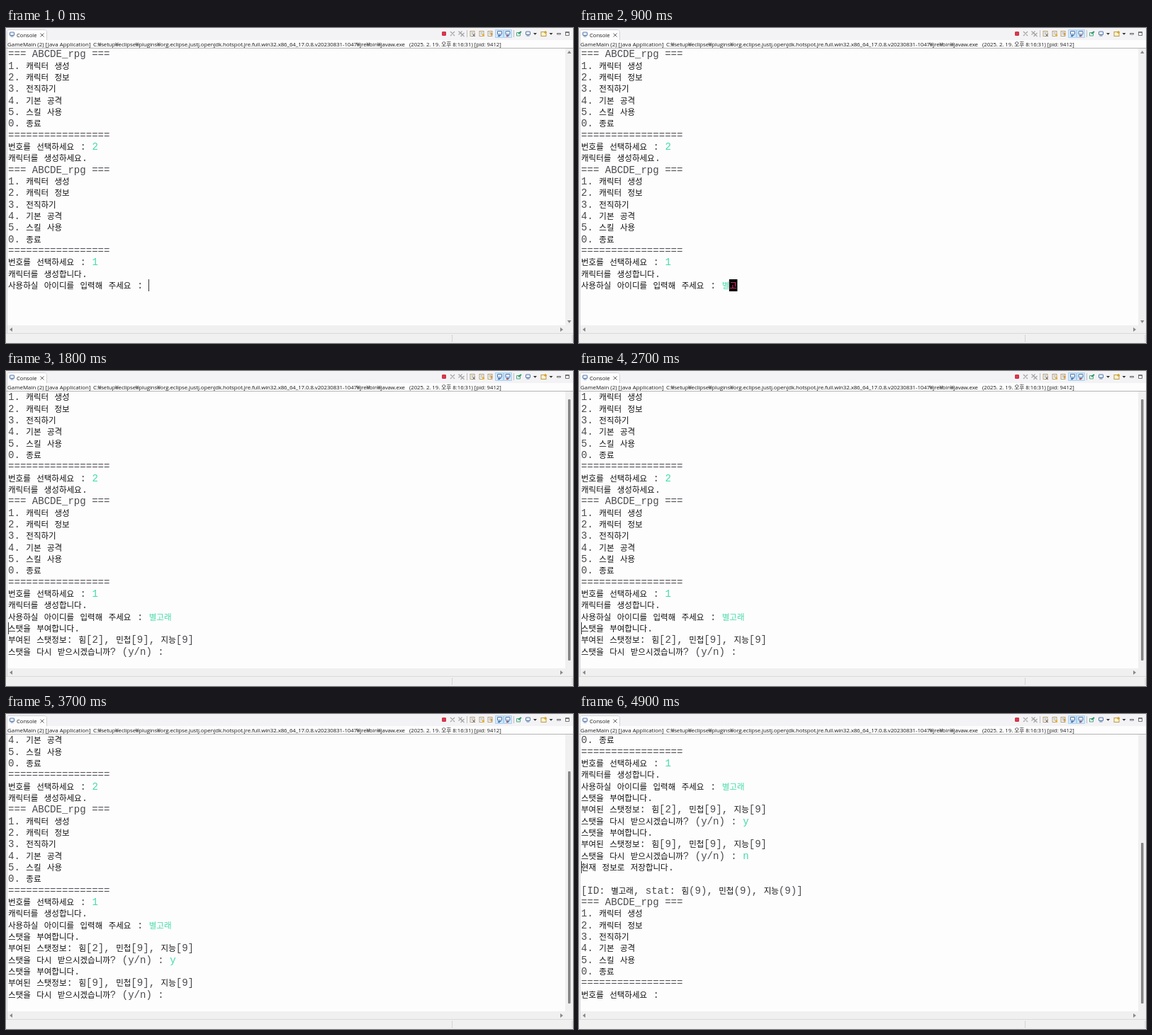
An HTML page that plays this animation: 800 px wide and 445 px high, repeating every 5000 ms.

```html
<!DOCTYPE html>
<html lang="ko">
<head>
<meta charset="utf-8">
<title>Console</title>
<style>
  html, body { margin: 0; width: 100%; height: 100%; overflow: hidden; background: #f0f0f0; }
  svg { display: block; width: 800px; height: 445px; }
  text { white-space: pre; }
  .ui { font-family: "Open Sans", "Noto Sans CJK KR", sans-serif; fill: #1a1a1a; }
  .mono { font: 14.07px "Liberation Mono", monospace; fill: #4c4c50; }
  .han { font: 11.5px "Noto Sans CJK KR", sans-serif; fill: #111; }
  .in { fill: #45dba6; }
  .comp { fill: #ff3782; }
</style>
</head>
<body>
<svg viewBox="0 0 800 445" xmlns="http://www.w3.org/2000/svg">
  <rect width="800" height="445" fill="#f0f0f0"/>
  <rect width="800" height="17" fill="#f3f3f5"/>
  <path d="M1.500 431V4.500Q1.500 2.500 4 2.500H54Q57.500 2.500 57.500 6V17" fill="none" stroke="#d2d2d6"/>
  <path d="M2 17V4.500Q2 3 4 3H54Q57 3 57 6V17z" fill="#fdfdfe"/>
  <rect x="2" y="17" width="798" height="11" fill="#fdfdfe"/>
  <rect x="2" y="29" width="787" height="391" fill="#fdfdfe"/>
  <path d="M0 28.500H800" stroke="#b4b4b6"/>
  <path d="M0 431.500H800" stroke="#d9d9d9"/>

  <g class="ui">
    <text x="15" y="12.500" font-size="7.6">Console</text>
    <text x="2" y="25.500" font-size="7.9">GameMain (2) [Java Application]</text>
    <text x="123" y="25.500" font-size="7.9" letter-spacing="-.1">C:₩setup₩eclipse₩plugins₩org.eclipse.justj.openjdk.hotspot.jre.full.win32.x86_64_17.0.8.v20230831-1047₩jre₩bin₩javaw.exe</text>
    <text x="569" y="25.500" font-size="7.7">(2025. 2. 19. 오후 8:16:31) [pid: 9412]</text>
  </g>
  <path d="M48.500 7.500l5 5m0-5l-5 5" stroke="#555" stroke-width=".9"/>

  <defs>
    <g id="screen">
      <rect x="-3" y="-3" width="6" height="4.500" rx=".5" fill="#e4efff" stroke="#4a6a9c" stroke-width=".9"/>
      <path d="M-2 3H2" stroke="#4a6a9c" stroke-width=".9"/>
    </g>
    <g id="page">
      <rect x="-3" y="-3.500" width="6" height="7" fill="#fffaf0" stroke="#a58b5c" stroke-width=".8"/>
      <path d="M-1.500-1.500H1.500M-1.500 .5H1.500" stroke="#7d94b5" stroke-width=".8"/>
    </g>
    <path id="drop" d="M-2.500-1H2.500L0 1.700z" fill="#333"/>
  </defs>

  <g fill="none">
    <use href="#screen" x="8.500" y="9"/>
    <rect x="615.500" y="5.500" width="5" height="5" rx=".5" fill="#e0354b" stroke="#c8324a"/>
    <path d="M627 5l6 6m0-6l-6 6M638.500 4.500l5 5m0-5l-5 5M641.500 7l5 5m0-5l-5 5" stroke="#a5a5a5" stroke-width="1.200"/>
    <path d="M650.500 3V13M716.500 3V13" stroke="#bdbdbd"/>
    <use href="#page" x="658" y="8"/>
    <path d="M658 8l4 4m0-4l-4 4" stroke="#777"/>
    <use href="#page" x="671" y="8"/>
    <path d="M672 12V8.500h3V12z" fill="#e3b53d"/>
    <use href="#page" x="683" y="8"/>
    <path d="M684 6l3 2.500l-3 2.500z" fill="#d69a38"/>
    <path d="M690.500 2.500h11v11h-11zM702.500 2.500h11v11h-11z" fill="#d3e9fb" stroke="#a9d0f0"/>
    <use href="#screen" x="696.500" y="7.500"/>
    <use href="#screen" x="708" y="7.500"/>
    <path d="M694 11.500h3" stroke="#3d78c0" stroke-width="1.500"/>
    <path d="M706 11.500h3" stroke="#d84b4b" stroke-width="1.500"/>
    <path d="M720.500 6.500h5v4.500h-5z" fill="#eaf7ef" stroke="#52a583"/>
    <path d="M723 8l4-3" stroke="#27996a" stroke-width="2"/>
    <use href="#screen" x="736.500" y="8"/>
    <use href="#drop" x="746.500" y="8"/>
    <rect x="755" y="5.500" width="7" height="6" fill="#fff4cf" stroke="#b99a50"/>
    <path d="M761 4v4m-2-2h4" stroke="#d7a421" stroke-width="1.300"/>
    <use href="#drop" x="769" y="8"/>
    <path d="M777.500 7.500h5v1.500h-5zM789.500 5.500h5v5h-5zM789.500 6.500h5" stroke="#555" stroke-width=".8"/>
  </g>

  <g fill="#8a8a8a">
    <path d="M9 423v6l-4-3zM782 423v6l4-3z"/>
    <path id="arrows" d="M792 36h5.500l-2.750-4zM792 413h5.500l-2.750 4z"/>
    <rect id="thumb" x="793" width="3.500" rx="1" fill="#858585"/>
  </g>
  <path d="M629.500 434V443M799 434V443" stroke="#b8b8b8" stroke-dasharray="1 1"/>

  <g id="log"></g>
</svg>
<script>
const LOOP = 5000, ROWS = 23, PITCH = 16.34;
const LEFT = 3, HAN = 10.58, MONO = 8.443;

const menu = ["=== ABCDE_rpg ===", "1. 캐릭터 생성", "2. 캐릭터 정보", "3. 전직하기",
  "4. 기본 공격", "5. 스킬 사용", "0. 종료", "=".repeat(17)];
const stats = n => ["스탯을 부여합니다.", `부여된 스탯정보: 힘[${n}], 민첩[9], 지능[9]`];
const pick = "번호를 선택하세요 : ", again = "스탯을 다시 받으시겠습니까? (y/n) : ";

// "|" separates printed text from keyboard input
const lines = [
  ...menu, pick + "|2", "캐릭터를 생성하세요.",
  ...menu, pick + "|1", "캐릭터를 생성합니다.",
  "사용하실 아이디를 입력해 주세요 : |별고래",
  ...stats(2), again + "|y",
  ...stats(9), again + "|n",
  "현재 정보로 저장합니다.", "", "[ID: 별고래, stat: 힘(9), 민첩(9), 지능(9)]",
  ...menu, pick
];

// time, lines shown, typed text, syllable being composed, caret line
const steps = [
  [0, 21, "", "", 20],
  [200, 21, "", "ㅂ", -1],
  [300, 21, "", "벼", -1],
  [500, 21, "", "별", -1],
  [700, 21, "별", "ㄱ", -1],
  [800, 21, "별", "고", -1],
  [1000, 21, "별고", "래", -1],
  [1200, 24, "", "", 21],
  [2800, 24, "y", "", 23],
  [3000, 25, "", "", 24],
  [3100, 27, "", "", 24],
  [3600, 27, "", "", -1],
  [3900, 27, "n", "", 26],
  [4100, 39, "", "", 27]
];

const $ = id => document.getElementById(id);
const log = $("log");

function add(tag, attrs, text = "") {
  const el = document.createElementNS("http://www.w3.org/2000/svg", tag);
  for (const key in attrs) el.setAttribute(key, attrs[key]);
  el.textContent = text;
  log.append(el);
}

const isHan = s => /[\u3131-\ud7a3]/.test(s);

// Draws mixed text run by run and returns the x where it ends
function write(text, x, y, kind = "") {
  for (const run of text.match(/[\u3131-\ud7a3]+|[^\u3131-\ud7a3]+/g) || []) {
    const han = isHan(run);
    add("text", { x, y, class: (han ? "han " : "mono ") + kind }, run);
    x += run.length * (han ? HAN : MONO);
  }
  return x;
}

function draw([, count, typed, comp, caret]) {
  log.replaceChildren();
  const top = Math.max(0, count - ROWS);
  for (let i = top; i < count; i++) {
    const y = 41.2 + (i - top) * PITCH;
    const [out, input = ""] = lines[i].split("|");
    const last = i === count - 1;
    let x = write(out, LEFT, y);
    x = write(last ? typed : input, x, y, "in");
    if (last && comp) {
      add("rect", { x: x - .5, y: y - 13, width: HAN + 1, height: 17, fill: "#000" });
      write(comp, x, y, "comp");
    }
    if (i === caret) {
      const cx = Math.floor(last ? x : LEFT);
      add("rect", { x: cx, y: y - 13, width: 1, height: 17, fill: "#333" });
    }
  }
  const size = 385 * ROWS / count, scrolled = top > 0;
  $("arrows").style.display = scrolled ? "none" : "";
  $("thumb").style.display = scrolled ? "" : "none";
  $("thumb").setAttribute("y", 409 - size);
  $("thumb").setAttribute("height", size);
}

let shown;
function tick() {
  const t = performance.now() % LOOP;
  const step = steps.findLast(s => s[0] <= t);
  if (step !== shown) draw(shown = step);
  requestAnimationFrame(tick);
}
tick();
</script>
</body>
</html>
```
